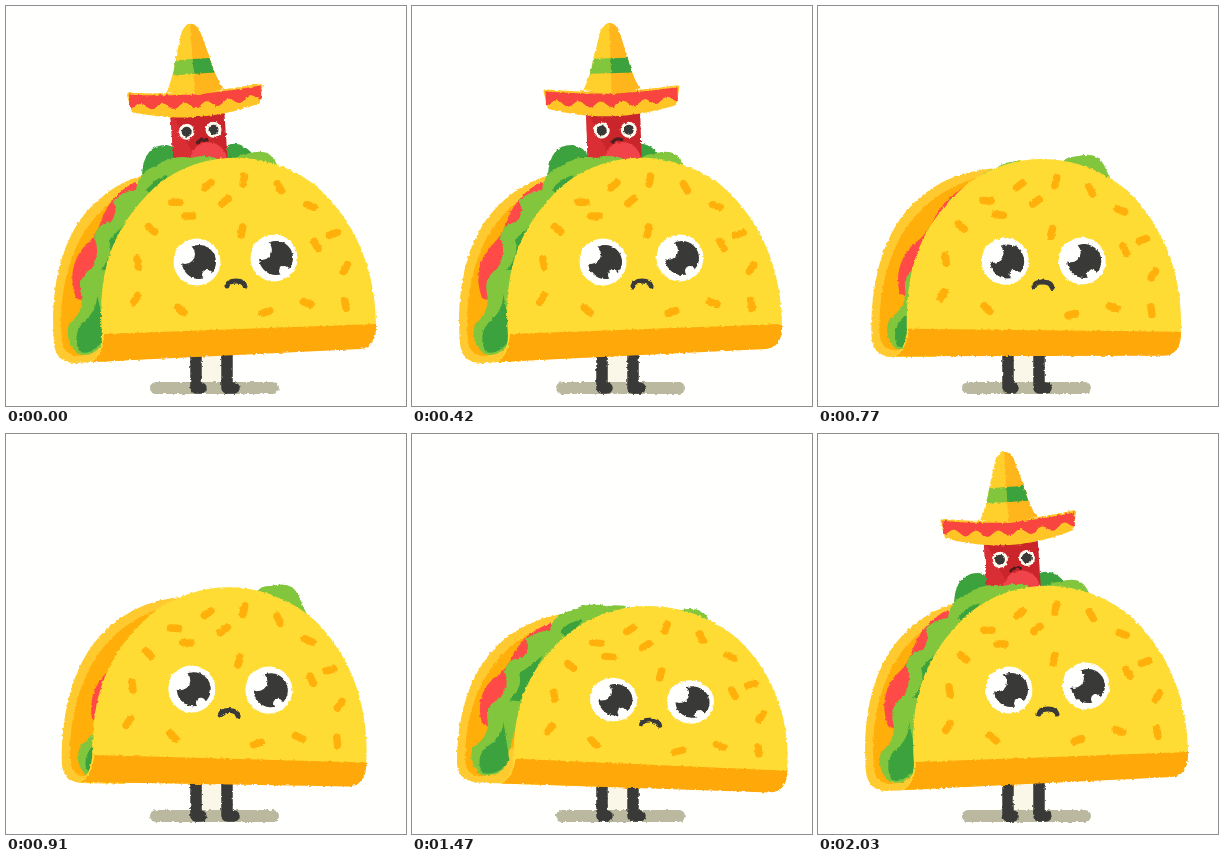
These frames come from a looping animation (400x400 px, 2100 ms). An HTML page:

```html
<!DOCTYPE html>
<html lang="en">
<head>
<meta charset="utf-8">
<title>Shy taco</title>
<style>
html, body { margin: 0; width: 100%; height: 100%; overflow: hidden; background: #fffffd; }
svg { display: block; width: 100vw; height: 100vh; }
</style>
</head>
<body>
<svg viewBox="0 0 400 400">
  <defs>
    <filter id="rough" filterUnits="userSpaceOnUse" x="0" y="0" width="400" height="400" color-interpolation-filters="sRGB">
      <feTurbulence id="noise" type="fractalNoise" baseFrequency=".3" numOctaves="2" result="n"/>
      <feDisplacementMap in="SourceGraphic" in2="n" scale="3" xChannelSelector="R" yChannelSelector="G"/>
    </filter>
    <g id="eye">
      <circle r="23.5" fill="#fffffd"/>
      <circle cx="2" r="17" fill="#393937"/>
      <circle cx="-12" cy="-8" r="10" fill="#fffffd"/>
      <circle cx="10" cy="13" r="5" fill="#fffffd"/>
    </g>
    <g id="bead">
      <circle r="8" fill="#fffbee"/>
      <circle r="5" fill="#393937"/>
    </g>
  </defs>
  <g filter="url(#rough)">
    <path d="M150 382H267" stroke="#bbb8a0" stroke-width="12" stroke-linecap="round"/>
    <path d="M190 340H221V376H190Z" fill="#faf7e8"/>
    <path d="M190 335V382H195M221 335V382H228" fill="none" stroke="#393937" stroke-width="11.5" stroke-linejoin="round" stroke-linecap="round"/>

    <g class="body">
      <path class="leaf" d="M136 168Q138 138 161 139Q172 141 176 150V170ZM215 160L222 139Q236 134 248 150L255 165Z" fill="#3ba23d"/>
      <g class="back">
        <path d="M48 338C44 290 52 230 90 196C110 178 130 169 160 164L200 200L122 338L112 355L68 357Q50 356 48 338Z" fill="#ffca30"/>
        <path d="M56 334C52 290 62 235 98 202Q120 181 158 170L190 200L92 330Q88 350 70 350Q57 348 56 334Z" fill="#ffae0a"/>
      </g>
      <path id="lump" d="M224 165Q226 148 241 148Q262 141 269 155L281 178L235 175Z" fill="#81c63d"/>
    </g>

    <g id="pepper">
      <path d="M-26 8H28V78H-26Z" fill="#cb252c"/>
      <path d="M-26 78V14L2 78Z" fill="#d92f34"/>
      <path d="M-12 78Q-10 50 8 49Q25 50 28 68V78Z" fill="#f0444a"/>
      <use href="#bead" x="-11" y="37"/>
      <use href="#bead" x="16" y="37"/>
      <path d="M-1 49Q4 44 9 47" fill="none" stroke="#4a2020" stroke-width="3" stroke-linecap="round"/>
      <path id="brim" fill="#ffc526" stroke="#ffc526" stroke-width="4" stroke-linejoin="round"/>
      <path id="trim" fill="#f9453f"/>
      <path d="M-28 -4Q-20 -20 -17 -36L-9 -63Q0 -78 9 -63L17 -36Q20 -20 28 -4Q0 5 -28 -4Z" fill="#ffcf2b"/>
      <path d="M0 -70Q6 -70 9 -63L17 -36Q20 -20 28 -4Q14 1 0 1Z" fill="#ffb51c"/>
      <path d="M-17 -35H0V-20H-21Z" fill="#81c63d"/>
      <path d="M0 -35H17L21 -20H0Z" fill="#3ba23d"/>
    </g>

    <g class="body">
      <g class="back"><g id="fill">
        <path d="M70 292Q60 264 77 242Q91 230 96 212Q106 188 129 176L150 190L90 300Z" fill="#ff4a48"/>
        <path d="M72 348Q58 335 63 318Q79 305 75 288Q71 272 86 262Q95 245 88 232Q91 217 105 216Q113 205 107 195Q117 185 130 184Q132 165 150 160Q165 148 185 152Q205 146 220 158V200L110 260L95 340Q85 352 72 348Z" fill="#81c63d"/>
        <path d="M74 346Q66 332 75 318Q92 305 91 288L100 330Q88 350 74 346ZM95 264Q108 248 103 234L125 212L106 264ZM140 184Q148 172 162 169L150 192Z" fill="#3ba23d"/>
      </g></g>
      <path d="M96 330C92 270 102 225 150 180C200 140 265 145 310 180C350 215 370 265 370 322Q370 341 352 342L84 356Q95 350 96 330Z" fill="#fedc34"/>
      <path d="M98 328L370 318Q371 341 354 343L86 356Q97 348 98 328Z" fill="#ffa80a"/>
      <g id="specks" stroke="#ffb00a" stroke-width="7.5" stroke-linecap="round"/>
      <use href="#eye" x="191" y="256"/>
      <use href="#eye" x="268" y="252"/>
      <path d="M221 280Q222 275 230 275Q238 275 239 280" fill="none" stroke="#393937" stroke-width="5" stroke-linecap="round"/>
    </g>
  </g>
</svg>
<script>
const STEP = 70, LOOP = 2100;
const $ = id => document.getElementById(id);
const place = (selector, value) =>
  document.querySelectorAll(selector).forEach(el => el.setAttribute('transform', value));

// Eleven specks follow the rim of the shell, a few more lie inside it.
const rim = Array.from({ length: 11 }, (_, i) => {
  const a = (173 + 19.7 * i) * Math.PI / 180;
  return [235 + 106 * Math.cos(a), 280 + 106 * Math.sin(a)];
});
const inner = [[175, 304], [183, 210], [219, 195], [236, 225], [310, 239], [301, 297], [260, 306]];
$('specks').innerHTML = [...rim, ...inner].map(([x, y], i) =>
  `<path d="M-4 0H4" transform="translate(${x} ${y}) rotate(${120 - 40 * i})"/>`).join('');

const smooth = p => (p = Math.min(1, Math.max(0, p)), p * p * (3 - 2 * p));
const ramp = (t, from, to) => smooth((t - from) / (to - from));
const bump = (t, mid, half) => smooth(1 - Math.abs(t - mid) / half);

function drawBrim(curl) {
  const top = [], low = [], wave = [];
  for (let x = -66; x <= 66; x += 2) {
    const bend = (x / 66) ** 2, y = -curl * bend;
    top.push([x, y]);
    low.unshift([x * .95, y + 21 - 5 * bend]);
    wave.unshift([x, y + 11 + 3 * Math.cos(x * Math.PI / 11)]);
  }
  const outline = pts => 'M' + pts.map(p => p.map(v => v.toFixed(1))).join('L') + 'Z';
  $('brim').setAttribute('d', outline([...top, ...low]));
  $('trim').setAttribute('d', outline([...top, ...wave]));
}

function draw(now) {
  const frame = Math.floor(now % LOOP / STEP), t = frame * STEP;

  // How far each action has gone, from 0 to 1
  const hide = ramp(t, 555, 714) - ramp(t, 1610, 1740);
  const left = ramp(t, 560, 880) - ramp(t, 1190, 1450);
  const right = ramp(t, 1190, 1450) - ramp(t, 1610, 1750);
  const sway = ramp(t, 210, 600) - ramp(t, 1750, 2090);
  const squash = bump(t, 630, 130);
  const hop = bump(t, 510, 110);
  const pop = bump(t, 1760, 180);

  const x = 208 - 11 * left + 4 * right - squash + 2 * pop;
  const y = 345 + 4 * right + 2 * squash - 5 * pop;
  const turn = 3.7 * left + 4.5 * right + 1.2 * squash + 1.9 * pop;
  const height = 1 - .1 * squash - .075 * right + .03 * pop;
  place('.body', `translate(${x} ${y}) rotate(${turn}) scale(1 ${height}) translate(-208 -345)`);
  place('.back', `translate(${18 * left - 8 * right} 0)`);
  place('.leaf', `translate(0 ${30 * hide})`);
  place('#lump', `translate(${22 * left + 10 * right + 14 * squash} ${6 * right + 4 * squash})`);

  const lean = .1 * left + .07 * squash;
  const rise = 1 - .02 * hide - .02 * squash + .04 * pop;
  place('#fill', `translate(0 348) matrix(1 0 ${-lean} ${rise} 0 0) translate(0 -348)`);

  const hatY = 88 + 157 * hide - 9 * hop - 2 * pop;
  place('#pepper', `translate(${189 + 19 * sway} ${hatY}) rotate(${4 * sway - 4}) scale(1 ${1 - .15 * squash})`);
  drawBrim(7 - 3 * Math.cos(t * Math.PI / 210) + 25 * bump(t, 630, 70));
  $('noise').setAttribute('seed', frame + 1);
}

const start = performance.now();
function tick() {
  draw(performance.now() - start);
  requestAnimationFrame(tick);
}
tick();
</script>
</body>
</html>
```
